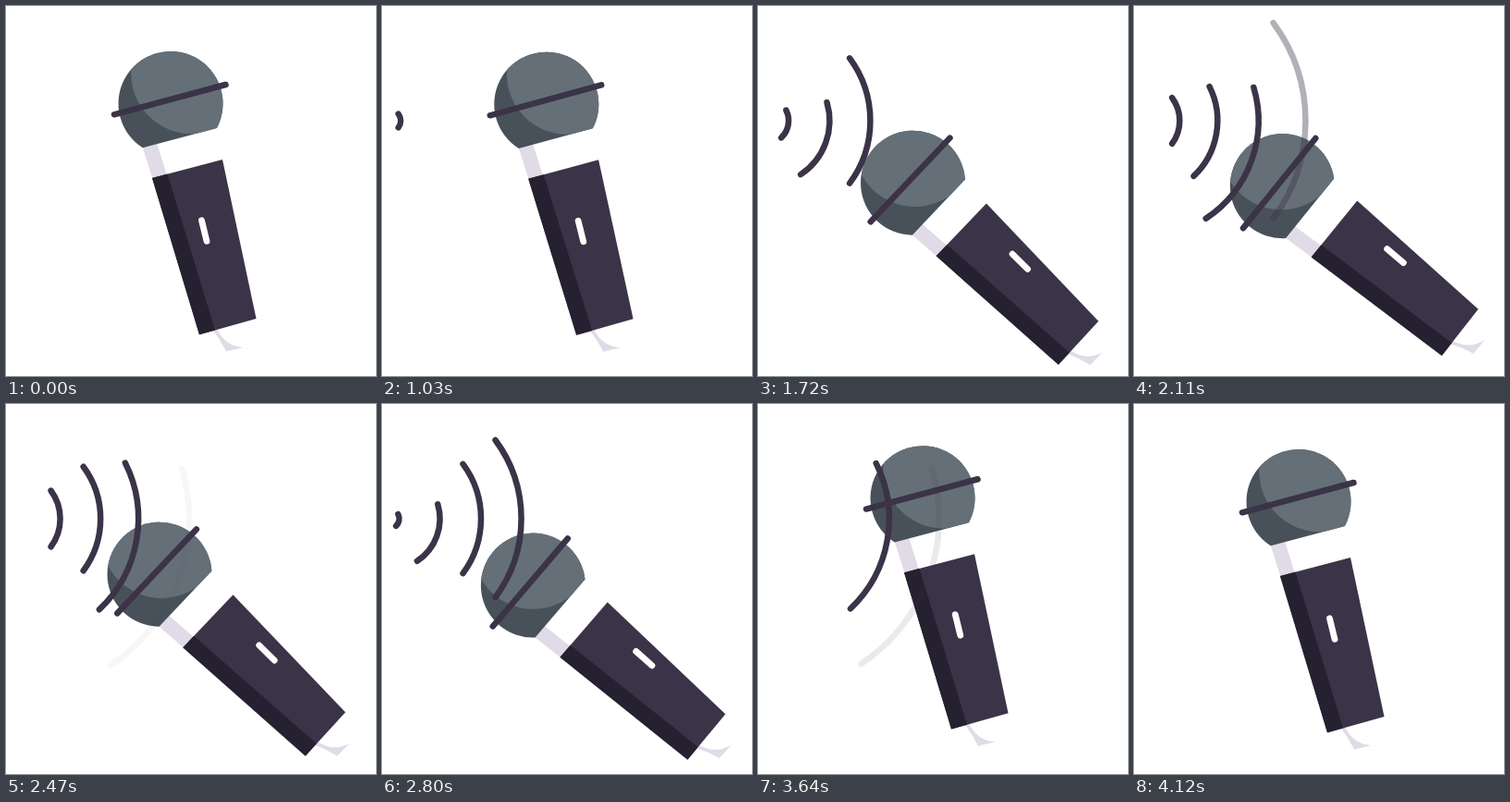
An HTML page with a canvas for the animation above (4.15 s loop, 400x400 px).

```html
<!DOCTYPE html>
<html>
<head>
<meta charset="utf-8">
<style>
html, body { margin: 0; width: 100%; height: 100%; overflow: hidden; background: #fff; }
canvas { display: block; }
</style>
</head>
<body>
<canvas id="stage" width="400" height="400"></canvas>
<script>
const ctx = document.getElementById('stage').getContext('2d');
const LOOP = 4150, START = 1030, STEP = 30;
const RAD = Math.PI / 180, TAU = Math.PI * 2;
const PLUM = '#3b3347', SHADE = '#252131', PALE = '#e0dbe7';
const CENTER = [208.5, 223.75];

// Each wave: time its radius is zero, tilt in degrees
const WAVES = [[945, 0], [1245, 20], [1547, 10], [1826, 0], [2123, 0], [2426, 20], [2726, 10]];

const clamp = v => Math.min(1, Math.max(0, v));
const ease = (t, from, to) => (1 - Math.cos(Math.PI * clamp((t - from) / (to - from)))) / 2;

function polygon(color, ...points) {
  ctx.fillStyle = color;
  ctx.beginPath();
  points.forEach(p => ctx.lineTo(...p));
  ctx.fill();
}

function line(color, width, x1, y1, x2, y2) {
  ctx.strokeStyle = color;
  ctx.lineWidth = width;
  ctx.beginPath();
  ctx.moveTo(x1, y1);
  ctx.lineTo(x2, y2);
  ctx.stroke();
}

function disc(color, x, y, r) {
  ctx.fillStyle = color;
  ctx.beginPath();
  ctx.arc(x, y, r, 0, TAU);
  ctx.fill();
}

function drawHead() {
  ctx.save();
  ctx.beginPath();
  ctx.arc(178, 105.5, 56.5, 27.9 * RAD, 122.3 * RAD, true);
  ctx.clip();
  ctx.fillStyle = '#485159';
  ctx.fillRect(110, 40, 140, 130);
  disc('#656f78', 200.5, 73, 65.2);
  ctx.restore();
  line(PLUM, 6.5, 117, 117.3, 237.5, 85);
}

function drawTail() {
  ctx.fillStyle = PALE;
  ctx.beginPath();
  ctx.moveTo(223.5, 350);
  ctx.quadraticCurveTo(232, 361, 238, 373.5);
  ctx.lineTo(257, 369);
  ctx.quadraticCurveTo(237, 368, 228, 349);
  ctx.fill();
}

function drawMic(slide) {
  polygon(PALE, [147.5, 152], [163, 148], [174, 183], [158.5, 187]);
  drawTail();
  polygon(PLUM, [158, 186], [234, 166], [270.5, 338], [209, 355.3]);
  polygon(SHADE, [158, 186], [174.5, 181.6], [226, 350.5], [209, 355.3]);
  const dx = 17.8 * slide, dy = -4.5 * slide;
  line('#fff', 6.8, 211.5 + dx, 231.8 + dy, 217 + dx, 254.3 + dy);
  drawHead();
}

// Tilt in, bob while singing, then swing back with a small lift;
// the button slides across the handle as it turns
function micPose(t) {
  if (t < START) return { x: 0, y: 0, turn: 0, slide: 0 };
  const rise = ease(t, 990, 1640);
  const held = (from, to) => rise * (1 - ease(t, from, to));
  const lift = 3.75 * ease(t, 2980, 3540) * (1 - ease(t, 3690, 4100));
  const beat = (t - 1720) / 595;
  const bob = Math.cos(TAU * (beat + 0.1));
  return {
    x: held(3070, 3600) * (46.2 + 0.9 * bob),
    y: held(2980, 3540) * (48.2 + 5 * bob) - lift,
    turn: held(3090, 3620) * (33.5 + 2.7 * Math.cos(TAU * (beat - 0.625))),
    slide: held(3210, 3750)
  };
}

function drawWave(age, tilt) {
  const radius = 0.1467 * age + 0.065 * Math.max(0, age - 1060);
  const alpha = clamp((1232 - age) / 172);
  if (radius < 7 || !alpha) return;
  ctx.globalAlpha = alpha;
  ctx.strokeStyle = PLUM;
  ctx.lineWidth = 6.5;
  ctx.beginPath();
  ctx.arc(7.7, 124, radius, (tilt - 36.5) * RAD, (tilt + 36.5) * RAD);
  ctx.stroke();
  ctx.globalAlpha = 1;
}

function draw(t) {
  ctx.fillStyle = '#fff';
  ctx.fillRect(0, 0, 400, 400);
  ctx.lineCap = 'round';

  const { x, y, turn, slide } = micPose(t);
  ctx.save();
  ctx.translate(CENTER[0] + x, CENTER[1] + y);
  ctx.rotate(-turn * RAD);
  ctx.translate(-CENTER[0], -CENTER[1]);
  drawMic(slide);
  ctx.restore();

  if (t >= START) WAVES.forEach(([birth, tilt]) => drawWave(t - birth, tilt));
}

const origin = performance.now();
function tick() {
  const t = (performance.now() - origin) % LOOP;
  draw(t < START ? 0 : START + Math.floor((t - START) / STEP) * STEP);
  requestAnimationFrame(tick);
}
tick();
</script>
</body>
</html>
```
